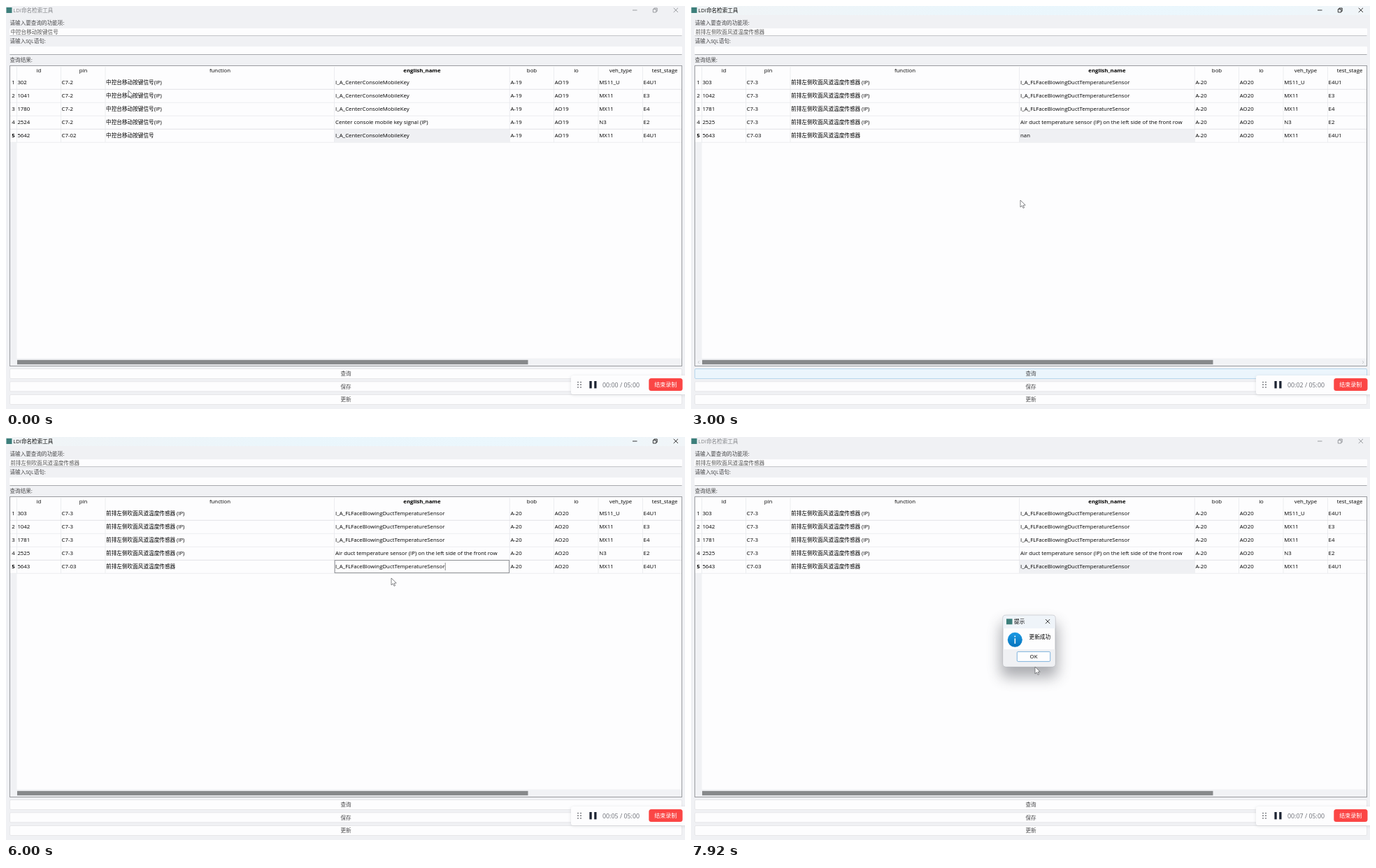
Animation, 971 px wide and 577 px high, one loop 8000 ms. Source, as an HTML page:

```html
<!DOCTYPE html>
<html lang="zh">
<head>
<meta charset="utf-8">
<title>LDI命名检索工具</title>
<style>
html, body { margin: 0; width: 100%; height: 100%; overflow: hidden; background: #f0f1f4; }
svg { display: block; width: 971px; height: 577px; }
text { font-family: "Open Sans", "Noto Sans", "Noto Sans CJK SC", "Noto Sans CJK", sans-serif; font-size: 7.82px; fill: #000; white-space: pre; }
.cjk { font-size: 7.64px; }
.song { font-family: "Noto Sans CJK SC", "Noto Sans CJK", sans-serif; font-size: 7.6px; font-weight: 300; fill: #4a4a4c; }
.half { font-family: "Liberation Mono", monospace; font-size: 6.33px; }
.mid { text-anchor: middle; }
</style>
</head>
<body>
<svg id="stage" viewBox="0 0 971 577" xmlns="http://www.w3.org/2000/svg">
  <defs>
    <linearGradient id="mica">
      <stop offset="0" stop-color="#f1f4f6"/><stop offset=".45" stop-color="#eaf6fc"/>
      <stop offset=".8" stop-color="#ebf7fd"/><stop offset="1" stop-color="#f1f5f8"/>
    </linearGradient>
    <linearGradient id="badge" x2="0" y2="1">
      <stop offset="0" stop-color="#1c9ae4"/><stop offset="1" stop-color="#0574bd"/>
    </linearGradient>
    <filter id="soft" x="-60%" y="-60%" width="220%" height="220%"><feGaussianBlur stdDeviation="10"/></filter>
    <filter id="thin" x="-20%" y="-50%" width="140%" height="200%"><feGaussianBlur stdDeviation="2"/></filter>
    <clipPath id="view"><rect x="6" y="86" width="960" height="429"/></clipPath>
  </defs>
</svg>
<script>
const NS = "http://www.w3.org/2000/svg";
const stage = document.getElementById("stage");
const LOOP = 8000, STEP = 1000 / 12;

function add(tag, attrs, parent = stage, content) {
  const node = document.createElementNS(NS, tag);
  for (const key in attrs) node.setAttribute(key, attrs[key]);
  if (content !== undefined) node.textContent = content;
  parent.appendChild(node);
  return node;
}
const rect = (x, y, width, height, fill, parent, more) => add("rect", { x, y, width, height, fill, ...more }, parent);
const line = (d, stroke, parent, more) => add("path", { d, stroke, fill: "none", ...more }, parent);
const text = (x, y, content, cls = "", parent, more) => add("text", { x, y, class: cls, ...more }, parent, content);
const set = (node, attrs) => { for (const key in attrs) node.setAttribute(key, attrs[key]); };
const show = (node, on) => node.setAttribute("visibility", on ? "visible" : "hidden");
const put = (node, content) => { if (node.textContent !== content) node.textContent = content; };
const clamp = v => Math.max(0, Math.min(1, v));
const ramp = (t, a, b) => clamp((t - a) / (b - a));
const smooth = p => p * p * (3 - 2 * p);

// Title bar
rect(0, 0, 971, 577, "#f0f1f4");
const titleBar = rect(0, 0, 971, 13, "url(#mica)");
rect(0.5, 2, 8, 8, "#3d7f7b");
const title = text(10.3, 9, "LDI命名检索工具", "", stage, { style: "font-size:7.6px" });
const controls = add("g", { "stroke-width": 0.9, fill: "none" });
add("path", { d: "M896 6H902.5M954.7 2.8L961 9M961 2.8L954.7 9" }, controls);
add("path", { d: "M925.3 4.6H929.8V9H925.3ZM926.8 4.4V3H931.2V7.4H930" }, controls);

// Query fields
text(5.5, 26.7, "请输入要查询的功能项:", "song");
const sqlLabel = text(5.5, 53.2, "请输入", "song");
add("tspan", { class: "half" }, sqlLabel, "SQL");
add("tspan", {}, sqlLabel, "语句:");
text(5.5, 79.8, "查询结果:", "song");
rect(5, 32, 962, 10.5, "#fdfdfe", stage, { rx: 1 });
rect(5, 58, 962, 11, "#fdfdfe", stage, { rx: 1 });
const fieldLine = line("M5.5 42.5H966.5", "#c2c4c8");
line("M5.5 69.5H966.5", "#a6a8ac");
const fieldMark = rect(6, 33, 69.5, 8.5, "#0078d4");
const fieldText = text(6.4, 39.9, "", "song");
const fieldCaret = line("M109.5 33.3V41", "#333", stage, { "stroke-width": 0.8 });

// Table
rect(5.5, 85.5, 961, 430, "#fdfdfe", stage, { stroke: "#9a9ca0" });
const table = add("g", { "clip-path": "url(#view)" });
rect(6, 195.5, 9.5, 319.5, "#f0f1f4", table);
rect(6, 504.5, 960, 10.5, "#f1f2f5", table);
const cols = [15.5, 78.5, 142, 469.5, 720.3, 783.5, 847, 910.5];
for (const x of cols) line(`M${x} 87V195`, "#e8e9ec", table, { "stroke-width": 0.8 });
for (let i = 1; i < 6; i++) line(`M6 ${100.3 + 19 * i}H966`, i % 3 == 1 ? "#dddee1" : "#eaebee", table, { "stroke-width": 0.8 });
const heads = [[47, "id"], [110.5, "pin"], [306, "function"], [595, "english_name"], [752, "bob"], [815.5, "io"], [879, "veh_type"], [942, "test_stage"]];
heads.forEach(([x, name], i) => text(x, 95.3, name, "mid", table, { "font-weight": i == 3 ? 700 : 400 }));
const cellFill = rect(470, 0, 250, 18.3, "#eff0f3", table);
const starts = [16.4, 79.6, 143, 471, 721.4, 784.8, 848.3, 911.6];
const cells = [], numbers = [];
for (let r = 0; r < 5; r++) {
  const y = 112.2 + 19 * r;
  numbers.push(text(10.4, y, r + 1, "mid", table));
  cells.push(starts.map((x, c) => text(x, y, "", c == 2 ? "cjk" : "", table)));
}
rect(16, 506.8, 730.5, 6.4, "#87898b", table);
const arrows = line("M12 508L10 510L12 512M960 508L962 510L960 512", "#8f9194", table, { "stroke-width": 0.8 });

// In-place editor
const editor = add("g", {});
rect(470.2, 0.5, 249.3, 18, "#fdfdfe", editor, { stroke: "#909296" });
const editMark = rect(471, 4, 157, 11, "#0078d4", editor);
const editText = text(471, 12.2, "", "", editor);
const editCaret = line("M628.2 4V15", "#444", editor, { "stroke-width": 0.6 });

const ids = [302, 1041, 1780, 2524, 5642];
const types = ["MS11_U", "MX11", "MX11", "N3", "MX11"];
const stages = ["E4U1", "E3", "E4", "E2", "E4U1"];
const ductKey = "I_A_FLFaceBlowingDuctTemperatureSensor";
const sets = [
  { name: "中控台移动按键信号", tail: "(IP)", key: "I_A_CenterConsoleMobileKey", long: "Center console mobile key signal (IP)", last: "I_A_CenterConsoleMobileKey" },
  { name: "前排左侧吹面风道温度传感器", tail: " (IP)", key: ductKey, long: "Air duct temperature sensor (IP) on the left side of the front row", last: "nan" }
];
function rowValues(n, r, last) {
  const s = sets[n], end = r == 4;
  return [String(ids[r] + n), (end ? "C7-0" : "C7-") + (2 + n), s.name + (end ? "" : s.tail),
    end ? last : r == 3 ? s.long : s.key, "A-" + (19 + n), "AO" + (19 + n), types[r], stages[r]];
}

// Buttons
const buttons = [["查询", 519.5], ["保存", 537.8], ["更新", 556.5]].map(([name, y]) => {
  rect(5.5, y, 961, 14, "#fdfdfe", stage, { rx: 1.5, stroke: "#e2e3e6", "stroke-width": 0.8 });
  const glow = rect(5.5, y, 961, 14, "#e5f3fc", stage, { rx: 1.5, stroke: "#9fcdec", "stroke-width": 0.9 });
  text(486, y + 9.9, name, "song mid");
  return glow;
});

// Recorder panel
rect(808, 530, 170, 27, "#8a8c92", stage, { rx: 3, opacity: 0.25, filter: "url(#thin)" });
rect(808, 529, 170, 27, "#fdfdfe", stage, { rx: 3 });
for (let i = 0; i < 6; i++) add("circle", { cx: 818 + 4 * (i % 2), cy: 538.6 + 3.6 * (i >> 1), r: 0.85, fill: "#55585f" });
rect(834.4, 537, 3.3, 10.4, "#1d2433");
rect(841.2, 537, 3.3, 10.4, "#1d2433");
const clock = text(853, 545.6, "", "", stage, { style: "font-size:8.85px;fill:#6b6e75" });
rect(919.3, 533, 48.2, 18, "#fb4645", stage, { rx: 3.5 });
text(943.3, 544.9, "结束录制", "mid", stage, { style: "font-size:8px;fill:#fff" });

// Message box
const dialog = add("g", {});
rect(443, 266, 81, 78, "#3b3d46", dialog, { rx: 8, opacity: 0.42, filter: "url(#soft)" });
const box = add("g", {}, dialog);
rect(446, 255.2, 75, 73.8, "#fdfdfe", box, { rx: 4, stroke: "#b3b5bb", "stroke-width": 0.8 });
const band = add("path", { d: "M446.4 274V259Q446.4 255.6 450 255.6H517Q520.6 255.6 520.6 259V274Z" }, box);
add("path", { d: "M446.4 304H520.6V325Q520.6 328.6 517 328.6H450Q446.4 328.6 446.4 325Z", fill: "#f0f1f4" }, box);
const face = add("g", {}, box);
rect(451, 260.3, 8.5, 8, "#3d7f7b", face);
text(462, 267, "提示", "cjk", face);
line("M507 261L513.2 267.2M513.2 261L507 267.2", "#222", face, { "stroke-width": 0.9 });
add("circle", { cx: 463.3, cy: 290.3, r: 10.5, fill: "url(#badge)" }, face);
rect(462.6, 288.3, 1.5, 7.6, "#fff", face);
add("circle", { cx: 463.3, cy: 285.4, r: 1, fill: "#fff" }, face);
text(483.5, 288.5, "更新成功", "cjk", face);
rect(466.3, 307.4, 47.4, 14, "#fdfdfe", face, { rx: 1.5, stroke: "#62a3d6", "stroke-width": 0.8 });
text(490, 317.3, "OK", "mid", face);

// Pointer
const arrow = add("path", { d: "M0 0V10L2.4 7.8L4 11.4L5.6 10.7L4.1 7.3L7.2 7.1Z", fill: "#fff", stroke: "#5c5e62", "stroke-width": 0.75 });
const beam = line("M-2 -5Q0 -5 0 -4Q0 -5 2 -5M0 -4V4M-2 5Q0 5 0 4Q0 5 2 5", "#3a3a3a", stage, { "stroke-width": 0.9 });

// time, x, y
const path = [
  [0, 175, 121], [80, 175, 121], [420, 100, 37], [500, 100, 37], [670, 20, 35], [1080, 20, 35],
  [1580, 457, 401], [1670, 457, 401], [2330, 473, 526], [2670, 473, 526], [3000, 471, 278],
  [3330, 588, 147], [4000, 590, 147], [4330, 591, 147], [4850, 591, 147], [5250, 549, 190],
  [5580, 550, 192], [5920, 550, 194], [6000, 551, 202], [6080, 551, 206], [6670, 516, 562],
  [7300, 516, 562], [7580, 503, 390], [7920, 492, 329], [LOOP, 492, 329]
];
function pointer(t) {
  const i = Math.max(1, path.findIndex(p => p[0] >= t));
  const [a, b] = [path[i - 1], path[i]];
  const p = smooth(ramp(t, a[0], b[0]));
  return [a[1] + (b[1] - a[1]) * p, a[2] + (b[2] - a[2]) * p];
}
const blinkOn = (t, start) => (t - start) % 1000 < 500;

function draw(t) {
  const within = (a, b) => t >= a && t < b;

  const active = within(410, 7160);
  show(titleBar, active);
  title.style.fill = active ? "#111" : "#85878b";
  controls.setAttribute("stroke", active ? "#222" : "#909297");

  // search field
  const pasted = t >= 1080;
  const marked = within(660, 1080);
  const focused = within(410, 2580);
  put(fieldText, sets[pasted ? 1 : 0].name);
  fieldText.style.fill = marked ? "#fff" : "#555";
  show(fieldMark, marked);
  show(fieldCaret, pasted && focused && blinkOn(t, 1080));
  fieldLine.setAttribute("stroke", focused ? "#8fbbe2" : "#c2c4c8");

  // results
  const data = t >= 2660 ? 1 : 0;
  const updated = t >= 5990;
  const last = updated ? ductKey : sets[data].last;
  const current = within(3410, 5410) ? 2 : 4;
  for (let r = 0; r < 5; r++) {
    rowValues(data, r, last).forEach((value, c) => put(cells[r][c], value));
    numbers[r].setAttribute("font-weight", r == current ? 700 : 400);
  }
  cellFill.setAttribute("y", 100.7 + 19 * current);

  const editTop = within(4240, 5410), editEnd = within(5660, 6830);
  const editing = editTop || editEnd;
  const chosen = editTop || (editEnd && !updated);
  show(editor, editing);
  editor.setAttribute("transform", `translate(0 ${100 + 19 * current})`);
  put(editText, editTop ? ductKey : last);
  editText.style.fill = chosen ? "#fff" : "#000";
  editMark.setAttribute("width", editTop || updated ? 157 : 13.5);
  show(editMark, editing && chosen);
  show(editCaret, editEnd && updated && blinkOn(t, 5990));

  // hover states
  const pulse = (a, b, c, d) => Math.min(ramp(t, a, b), 1 - ramp(t, c, d));
  arrows.setAttribute("opacity", 0.6 * Math.max(pulse(2080, 2330, 2900, 3500), pulse(6400, 6500, 6600, 6750)));
  buttons[0].setAttribute("opacity", pulse(2200, 2420, 2830, 3420));
  buttons[1].setAttribute("opacity", 0.5 * pulse(6450, 6550, 6580, 6750));
  const pressed = t >= 6830;
  set(buttons[2], {
    opacity: pulse(6500, 6700, 7280, 7570),
    fill: pressed ? "#d6e8fb" : "#e5f3fc",
    stroke: pressed ? "#8fbfe8" : "#9fcdec"
  });

  put(clock, `00:0${Math.max(0, Math.floor((t - 40) / 1000))} / 05:00`);

  // message box opens from its upper left
  const grow = 1 - (1 - ramp(t, 7160, 7420)) ** 2;
  const scale = 0.85 + 0.15 * grow;
  show(dialog, t >= 7160);
  set(dialog, { opacity: 0.7 + 0.3 * grow, transform: `translate(446 270) scale(${scale}) translate(-446 -270)` });
  face.setAttribute("opacity", 0.65 + 0.35 * grow);
  band.setAttribute("fill", grow < 1 ? "#f6f7f9" : "#eff4f9");

  const [x, y] = pointer(t);
  const overText = (y > 31 && y < 43) || (editTop && y > 138 && y < 157);
  show(arrow, !overText);
  show(beam, overText);
  const place = `translate(${x.toFixed(2)} ${y.toFixed(2)})`;
  arrow.setAttribute("transform", place);
  beam.setAttribute("transform", place);
}

const begin = performance.now();
function tick() {
  const t = (performance.now() - begin) % LOOP;
  draw(Math.min(LOOP - 1, Math.floor((t + 5) / STEP) * STEP));
  requestAnimationFrame(tick);
}
tick();
</script>
</body>
</html>
```
